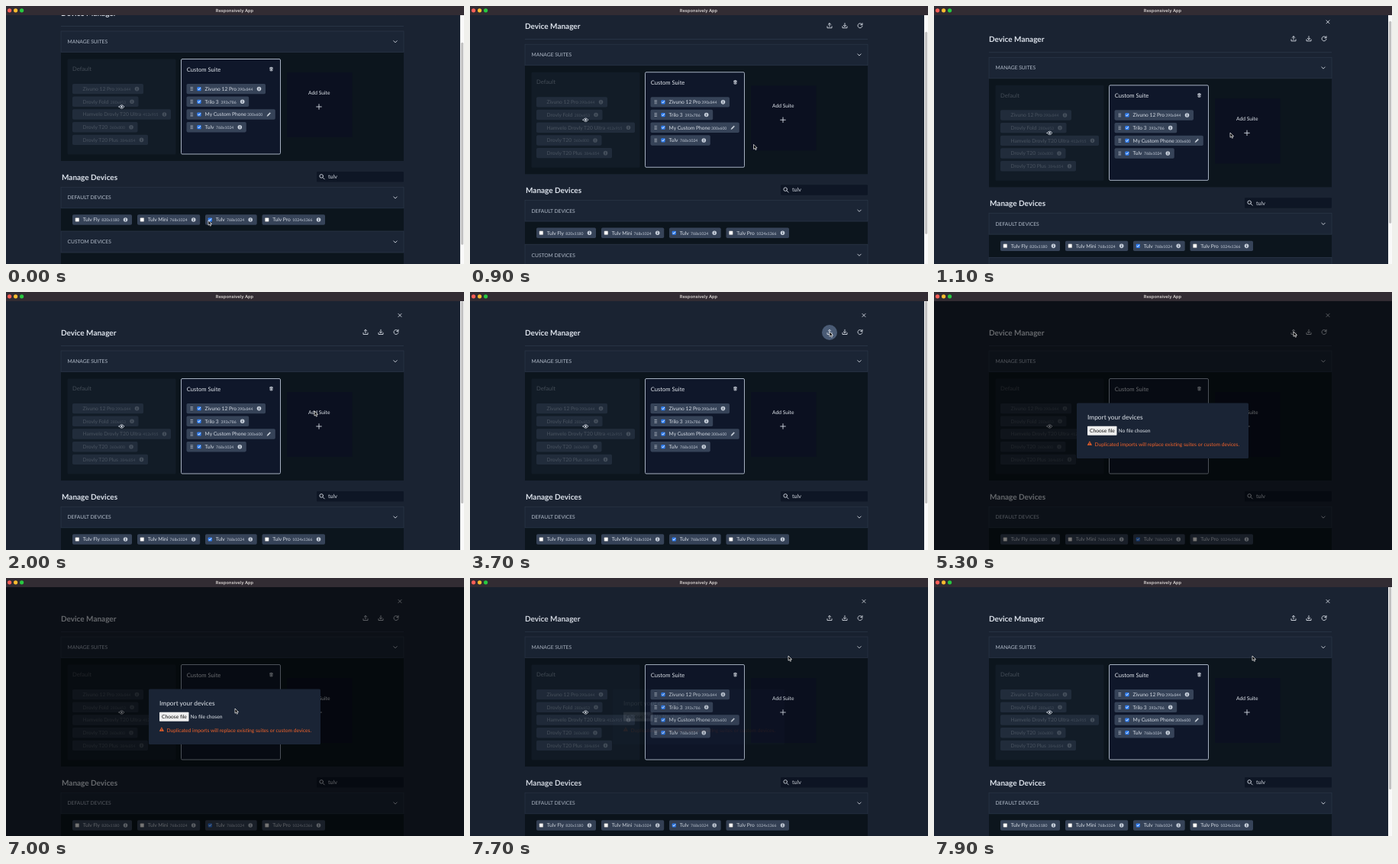
Animation, 600 px wide and 338 px high, one loop 8000 ms. Source, as an HTML page:

```html
<!DOCTYPE html>
<html lang="en">
<head>
<meta charset="utf-8">
<title>Device Manager</title>
<style>
  html, body { margin: 0; width: 100%; height: 100%; overflow: hidden; background: #1a2332; }
  svg { display: block; width: 100vw; height: 100vh; font-family: Lato, sans-serif; }
  text { white-space: pre; text-rendering: geometricPrecision; }
  .line { fill: none; stroke: #d5dbe4; stroke-width: .9; stroke-linecap: round; stroke-linejoin: round; }
  .dim { opacity: .42; }
  .dim text, .dim circle { opacity: .6; }
</style>
</head>
<body>
<svg id="stage" viewBox="0 0 600 338" preserveAspectRatio="none"></svg>
<script>
const LOOP = 8000;
const INK = '#d5dbe4';

const rect = (x, y, w, h, fill, extra = '') =>
  `<rect x="${x}" y="${y}" width="${w}" height="${h}" fill="${fill}" ${extra}/>`;
// y is the vertical middle of the line of text
const text = (x, y, str, size = 6.7, fill = INK, extra = '') =>
  `<text x="${x}" y="${y + size * .35}" font-size="${size}" fill="${fill}" ${extra}>${str}</text>`;
const icon = (x, y, d, extra = '') =>
  `<path class="line" transform="translate(${x} ${y})" d="${d}" ${extra}/>`;

const info = (x, y) =>
  `<circle cx="${x}" cy="${y}" r="2.8" fill="#c3cbd7"/>` +
  rect(x - .4, y - .5, .8, 2.1, '#334155') + rect(x - .4, y - 1.7, .8, .8, '#334155');
const pencil = (x, y) =>
  icon(x, y, 'M-2.2 2.2L-1.7 .7L1.4-2.3L2.3-1.4L-.7 1.7Z', `style="fill:${INK};stroke-width:.4"`);

const checkbox = (x, y, on) => on
  ? rect(x - 2.6, y - 2.6, 5.2, 5.2, '#2f7df0', 'rx=".8"') +
    icon(x, y, 'M-1.4 .1L-.4 1.2L1.5-1.2', 'style="stroke:#fff"')
  : rect(x - 2.5, y - 2.5, 5, 5, '#fff', 'rx=".7" stroke="#777" stroke-width=".4"');

function handle(x, y) {
  let dots = '';
  for (const dy of [-1.9, 0, 1.9])
    for (const dx of [-.9, .9]) dots += `<circle cx="${x + dx}" cy="${y + dy}" r=".6" fill="${INK}"/>`;
  return dots;
}

// end is the middle of the icon on the right
const chip = (x, textX, end, y, name, size, mark = info) =>
  rect(x, y - 6.7, end + 8.5 - x, 13.4, '#364358', 'rx="1.8"') +
  text(textX, y, name) +
  text(end - 8, y + .5, size, 5.1, '#c3cbd7', 'text-anchor="end"') +
  mark(end, y);

const suiteRow = i => 152.6 + i * 16.7;

const defaults = [
  ['Zivuno 12 Pro', '390x844', 171.5],
  ['Drovly Fold', '280x653', 165],
  ['Hamvelo Drovly T20 Ultra', '412x915', 207.5],
  ['Drovly T20', '360x800', 164],
  ['Drovly T20 Plus', '384x854', 177.5],
].map(([name, size, end], i) => chip(87, 100.5, end, suiteRow(i), name, size)).join('');

const custom = [
  ['Zivuno 12 Pro', '390x844', 331.5],
  ['Trilo 3', '393x786', 309.7],
  ['My Custom Phone', '300x600', 344.3, pencil],
  ['Tulv', '768x1024', 306.3],
].map(([name, size, end, mark], i) => {
  const y = suiteRow(i);
  return chip(236.5, 260.5, end, y, name, size, mark) + handle(243.3, y) + checkbox(253, y, true);
}).join('');

const devices = [
  [87, 'Tulv Fly', '820x1180', 156.5],
  [172, 'Tulv Mini', '768x1024', 245.7],
  [261, 'Tulv', '768x1024', 320.2, true],
  [335.5, 'Tulv Pro', '1024x1366', 409.5],
].map(([x, name, size, end, on]) =>
  chip(x, x + 13.7, end, 324, name, size) + checkbox(x + 6.3, 324, on)).join('');

const panel = (y, headH, bodyH, title) =>
  rect(72, y, 449, headH + bodyH, '#0c151d') +
  rect(72, y, 449, headH, '#1b2535', 'stroke="#2b3749" stroke-width=".7"') +
  text(80.5, y + headH / 2, title, 6.7, '#b3bdcb') +
  icon(510, y + headH / 2, 'M-2.2-1.1L0 1.1L2.2-1.1');

const tray = 'M-3 1V3H3V1M0 1.2V-3.2';
const page =
  icon(516, 30.5, 'M-2-2L2 2M2-2L-2 2') +
  text(72, 53, 'Device Manager', 10, '#dde3ec', 'font-weight="700"') +
  '<circle id="hover" cx="471" cy="53" r="10" fill="#4a5b75"/>' +
  icon(471, 52.5, tray + 'M-1.7-1.5L0-3.2L1.7-1.5') +
  icon(491, 52.5, tray + 'M-1.7-.5L0 1.2L1.7-.5') +
  icon(511, 52.5, 'M2.8-1.2A3 3 0 1 0 3 .6M3-3.2V-1H.8') +
  rect(72, 70, 449, .8, '#2b3749') +
  panel(77, 27.5, 142.5, 'MANAGE SUITES') +
  rect(80.5, 113.5, 142, 125, '#121c27', 'rx="1.5"') +
  `<g class="dim">${text(87, 126.5, 'Default', 7.6)}${defaults}</g>` +
  icon(151.5, 176, 'M-3.4 0Q0-4.6 3.4 0Q0 4.6-3.4 0Z') +
  `<circle cx="151.5" cy="176" r="1.2" fill="${INK}"/>` +
  rect(229.5, 113.5, 130, 124.5, '#0f172a', 'rx="1.5" stroke="#a5b0c0"') +
  text(236.8, 127, 'Custom Suite', 7.6, '#e2e7ee') +
  icon(347.5, 126.6, 'M-1.8-1.5H1.8M-1.4-1.5V2.2H1.4V-1.5M-.6-2.2H.6M0-.2V1') +
  custom +
  rect(368, 131, 85.5, 85, '#0b1020') +
  text(410.3, 157.5, 'Add Suite', 6.7, '#e2e7ee', 'text-anchor="middle"') +
  icon(410, 176, 'M-3.3 0H3.3M0-3.3V3.3') +
  text(73, 268, 'Manage Devices', 10, '#dde3ec', 'font-weight="700"') +
  rect(407, 261, 114, 13.4, '#0e1625', 'rx="1"') +
  icon(414, 267.7, 'M1 1L3.2 3.2M1.5-.8A2.3 2.3 0 1 1-3.1-.8A2.3 2.3 0 1 1 1.5-.8') +
  text(422, 267.7, 'tulv', 7.2) +
  panel(281.3, 27.5, 30.2, 'DEFAULT DEVICES') +
  devices +
  panel(339, 28, 40, 'CUSTOM DEVICES');

const dialog =
  rect(0, 12, 600, 326, '#000', 'opacity=".54"') +
  rect(187, 145.5, 225, 72.5, '#1a2435', 'rx="1.5"') +
  text(201, 163.7, 'Import your devices', 8.4, '#e2e7ee') +
  rect(201, 175.7, 38.5, 12, '#efefef', 'rx=".8"') +
  text(204, 181.8, 'Choose file', 6.7, '#111') +
  text(241.5, 181.8, 'No file chosen', 6.7, '#e2e7ee') +
  '<path d="M203.9 195.2L207 200.8H200.8Z" fill="#f2622a"/>' +
  rect(203.5, 197, .8, 1.9, '#1a2435') + rect(203.5, 199.4, .8, .7, '#1a2435') +
  text(210.5, 199.7, 'Duplicated imports will replace existing suites or custom devices.', 6.7, '#f2622a');

const lights = ['#ff5f57', '#febc2e', '#28c840']
  .map((c, i) => `<circle cx="${4.6 + i * 8}" cy="5.8" r="2.6" fill="${c}"/>`).join('');

document.getElementById('stage').innerHTML =
  rect(0, 0, 600, 338, '#1a2332') +
  `<g id="page">${page}</g>` +
  `<g id="bar">${rect(595, 12, 5, 326, '#fafafa')}` +
  rect(596, 12, 3.2, 265, '#c1c1c1', 'id="thumb" rx="1.5"') + '</g>' +
  `<g id="dialog">${dialog}</g>` +
  rect(0, 0, 600, 12, '#322c33') + lights +
  text(299.5, 5.9, 'Responsively App', 5.7, '#d8d3d1',
    'text-anchor="middle" font-weight="600" style="font-family:Inter,sans-serif"') +
  `<path id="cursor" d="M0 0V6.2L1.5 4.9L2.5 7.2L3.6 6.7L2.6 4.5H4.5Z"
    fill="#000" stroke="#fff" stroke-width=".7" stroke-linejoin="round"/>`;

const [pageEl, hoverEl, barEl, thumbEl, dialogEl, cursorEl] =
  ['page', 'hover', 'bar', 'thumb', 'dialog', 'cursor'].map(id => document.getElementById(id));

const scrollKeys = [[0, 44], [700, 44], [1100, 9.7], [1300, 0]];
const fadeKeys = [[3780, 0], [3950, 1], [7520, 1], [7720, 0]];
const cursorKeys = [
  [0, 265, 281], [400, 265, 281], [1050, 388, 166], [1300, 388, 166],
  [1900, 404, 156], [2400, 404, 156], [3000, 440, 98], [3450, 471, 52],
  [6000, 471, 52], [6200, 394, 106], [6400, 394, 106], [6700, 300, 171],
  [7050, 300, 171], [7500, 417, 102],
];
const smooth = p => p * p * (3 - 2 * p);

// Values of a key list at time t
function at(keys, t, ease = p => p) {
  const next = keys.findIndex(k => k[0] > t);
  if (next < 1) return keys.at(next).slice(1);
  const a = keys[next - 1], b = keys[next];
  const p = ease((t - a[0]) / (b[0] - a[0]));
  return a.slice(1).map((v, i) => v + (b[i + 1] - v) * p);
}

function draw(now) {
  const t = now % LOOP;
  const [scroll] = at(scrollKeys, t);
  const [fade] = at(fadeKeys, t);
  const [x, y] = at(cursorKeys, t, smooth);
  pageEl.setAttribute('transform', `translate(0 ${-scroll})`);
  thumbEl.setAttribute('y', 12 + scroll * .81);
  barEl.setAttribute('visibility', fade > 0 ? 'hidden' : 'visible');
  dialogEl.setAttribute('opacity', fade);
  const over = Math.hypot(x - 471, y - 53) < 10 && fade === 0;
  hoverEl.setAttribute('visibility', over ? 'visible' : 'hidden');
  cursorEl.setAttribute('transform', `translate(${x} ${y})`);
}

const start = performance.now();
function tick() {
  draw(performance.now() - start);
  requestAnimationFrame(tick);
}
tick();
</script>
</body>
</html>
```
